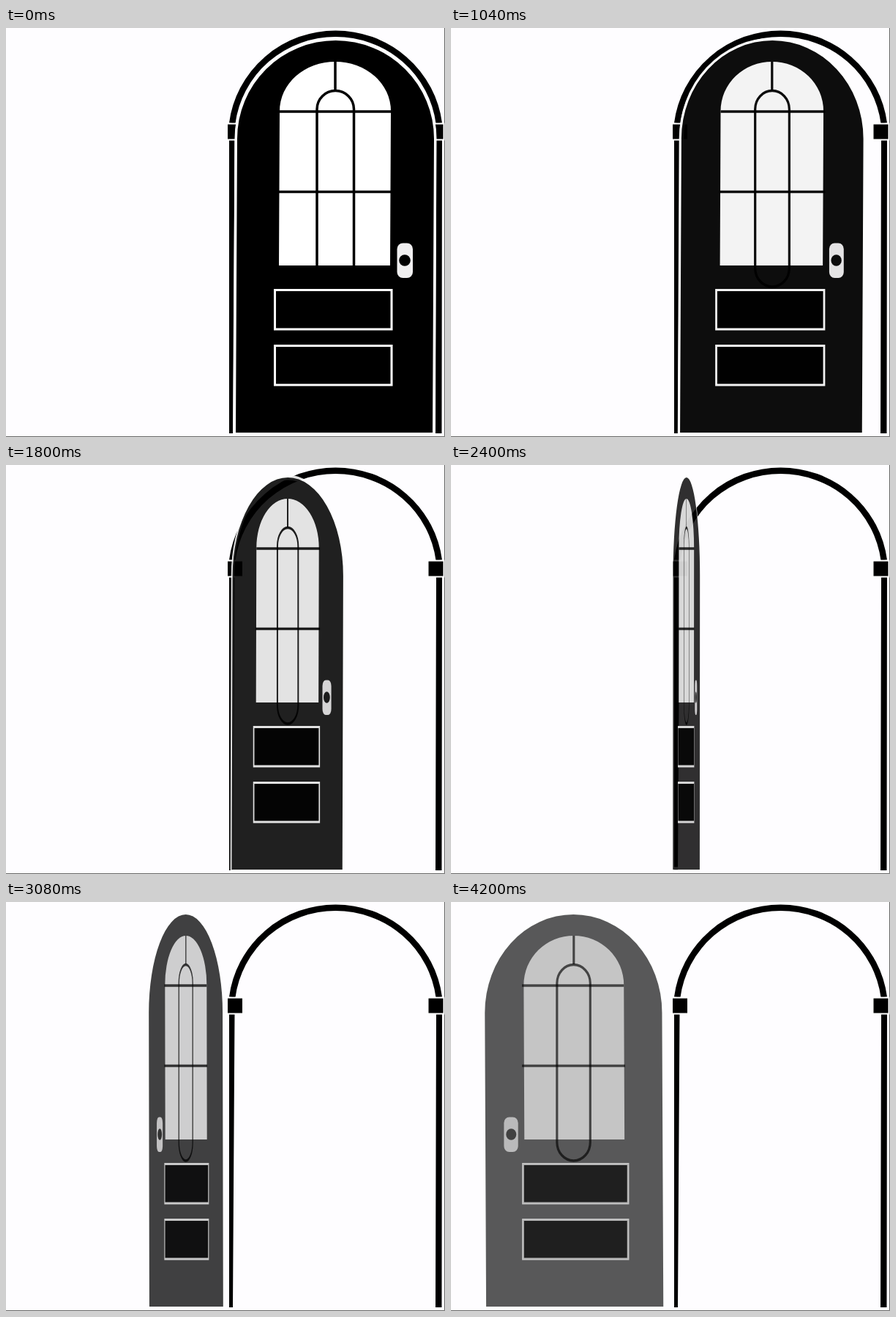
Animation, 600 px wide and 558 px high, one loop 5360 ms. Source, as an HTML page:

```html
<!DOCTYPE html>
<html lang="en">
<head>
<meta charset="utf-8">
<title>Opening door</title>
<style>
  html, body { margin: 0; width: 100%; height: 100%; overflow: hidden; background: #fefdff; }
  svg { display: block; width: 100%; height: 100%; }
  .line { fill: none; stroke: #000; stroke-width: 3.5; }
  .panel { fill: #000; stroke: #fff; stroke-width: 3; }
  .block { stroke: #fff; stroke-width: 2; }
</style>
</head>
<body>
<svg viewBox="0 0 600 558">
  <rect width="600" height="558" fill="#fefdff"/>
  <path d="M0 557.5H599.5V0" fill="none" stroke="#666"/>

  <g id="frame">
    <path d="M309.2 130A142.5 140.5 0 0 1 591.8 130" fill="none" stroke="#000" stroke-width="8.5"/>
    <path d="M305 153H312.5L310 553H305ZM588 153H596L595.5 553H587Z"/>
    <rect class="block" x="302" y="130.5" width="22" height="22"/>
    <rect class="block" x="576.5" y="130.5" width="22" height="22"/>
  </g>

  <g id="door">
    <path d="M314 552L316 151A134.5 134 0 0 1 585 151L583 552Z"
          stroke="#fff" stroke-width="7" paint-order="stroke"/>
    <path d="M373 324L374 113A76 67 0 0 1 526 113L525 324Z" fill="#fff"/>
    <path class="line" d="M450 46V85"/>
    <path class="line" d="M374 114H528.5"/>
    <path class="line" d="M372 223.5H528.5"/>
    <rect class="line" x="425" y="85.5" width="50.5" height="267.5" rx="25.25"/>
    <rect class="panel" x="367.5" y="357.5" width="159.5" height="53.5"/>
    <rect class="panel" x="367.5" y="433.5" width="159.5" height="53.5"/>
    <rect x="534.5" y="293.5" width="21.5" height="47.5" rx="8" fill="#f0eff0"/>
    <circle cx="545" cy="317" r="7.8"/>
  </g>
</svg>
<script>
  const LOOP = 5360, STEP = 40;
  const START = 530, END = 4040;
  const HINGE_X = 301.5, SWING = 154.2 * Math.PI / 180, FADE = 0.35;
  const door = document.getElementById('door');

  function draw(now) {
    const time = Math.floor(now % LOOP / STEP) * STEP;
    const progress = Math.min(1, Math.max(0, (time - START) / (END - START)));
    const scale = Math.cos(progress * SWING);
    const alpha = 1 - FADE * progress;

    door.setAttribute('transform', `translate(${HINGE_X * (1 - scale)}) scale(${scale} 1)`);
    // Each part fades separately, so overlapping parts show through one another.
    door.setAttribute('fill-opacity', alpha);
    door.setAttribute('stroke-opacity', alpha);
    requestAnimationFrame(() => draw(performance.now()));
  }
  draw(performance.now());
</script>
</body>
</html>
```
